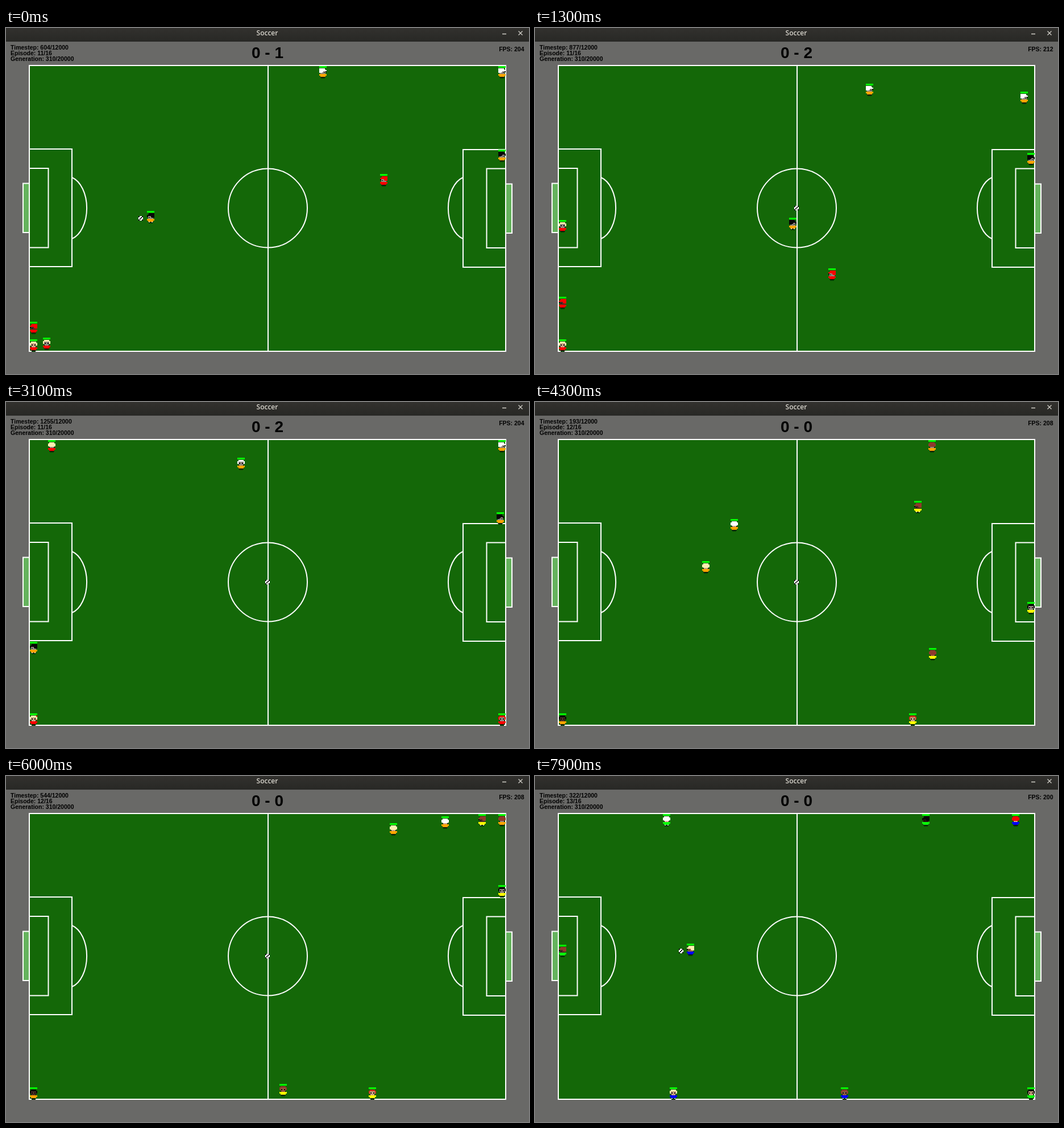
Animation, 920 px wide and 609 px high, one loop 8 s. Source, as an HTML page with a canvas:

```html
<!DOCTYPE html>
<html lang="en">
<head>
<meta charset="utf-8">
<title>Soccer</title>
<style>
  html, body { margin: 0; width: 100%; height: 100%; overflow: hidden; background: #696967; }
  svg, canvas { position: absolute; left: 0; top: 0; width: 920px; height: 609px; }
  text { font: bold 10.5px "Liberation Sans", Arial, sans-serif; fill: #000; white-space: pre; }
  .title { font: 600 12px "Open Sans", "Noto Sans", sans-serif; fill: #d8d5cd; }
  .score { font-size: 28px; }
  .lines { fill: none; stroke: #fff; stroke-width: 2; }
  .icon { fill: none; stroke: #d0cec7; stroke-width: 1.3; }
</style>
</head>
<body>
<svg viewBox="0 0 920 609">
  <defs>
    <linearGradient id="bar" x2="0" y2="1">
      <stop offset="0" stop-color="#32312e"/>
      <stop offset="1" stop-color="#282825"/>
    </linearGradient>
    <pattern id="net" width="2" height="2" patternUnits="userSpaceOnUse">
      <rect width="2" height="2" fill="#55a94c"/>
      <path d="M0 0h1v1h-1zM1 1h1v1h-1z" fill="#76bd6f"/>
    </pattern>
  </defs>
  <rect width="920" height="609" fill="#696967"/>
  <rect width="920" height="24" fill="url(#bar)"/>
  <text class="title" x="459.5" y="13" text-anchor="middle">Soccer</text>
  <path class="icon" d="M873 10.5h7M901.5 5.5l7 7m0-7l-7 7"/>

  <text id="step" x="8" y="38"></text>
  <text id="episode" x="8" y="48"></text>
  <text x="8" y="58">Generation: 310/20000</text>
  <text id="score" class="score" x="460" y="53" text-anchor="middle"></text>
  <text id="fps" x="911.5" y="41" text-anchor="end"></text>

  <rect x="41" y="66" width="838" height="503" fill="#146808"/>
  <path d="M30 273.5h11v86.5h-11zM879 274.5h11v86.5h-11z" fill="url(#net)"/>
  <g class="lines">
    <rect x="41" y="66" width="838" height="503"/>
    <path d="M461 66v503"/>
    <circle cx="460.5" cy="317" r="69.5"/>
    <path d="M41 213h75v207h-75M41 247h33.5v139.5h-33.5M41 273.5h-11v86.5h11"/>
    <path d="M116 263A35.5 56 0 0 1 116 371"/>
    <path d="M879 214h-75v207h75M879 247.5h-33.5v139.5h33.5M879 274.5h11v86.5h-11"/>
    <path d="M804 263A35.5 56 0 0 0 804 371"/>
  </g>
</svg>
<canvas id="play" width="920" height="609"></canvas>
<script>
const LOOP = 8000, TICK = 100;
const ctx = document.getElementById('play').getContext('2d');
const label = (id, text) => {
  const el = document.getElementById(id);
  if (el.textContent !== text) el.textContent = text;
};

// h hair, s skin, t shirt, f feet, k black, d shadow
const VIEWS = {
  f: ['.hhhhhh.', 'hhhhhhhh', 'hssssssh', 'hskssksh', '.ssssss.', '.kssssk.',
      'tttttttt', 'tttttttt', '.tttttt.', '.kfkkfk.', '..dddd..'],
  b: ['.hhhhhh.', 'hhhhhhhh', 'hhhhhhhh', 'hhhhhhhh', '.hhhhhh.', '.kssssk.',
      'tttttttt', 'tttttttt', '.tttttt.', '.kfkkfk.', '..dddd..'],
  l: ['..hhhhhh', '.hhhhhhh', 'hhhhhhhh', 'kssshhhh', '.sksshhh', '.ssssss.',
      'tttttttt', 'tttttttt', '.tttttt.', '.kfkkfk.', '..dddd..']
};
VIEWS.r = VIEWS.l.map(row => [...row].reverse().join(''));
const BALL = ['kwwk', 'wwkw', 'wkww', 'kwwk'];

const WHITE = '#ffffff', BLOND = '#ffeeb0', BLACK = '#060606', BROWN = '#8f3a2c', RED = '#ff0000';
const TAN = '#c9a182', GREY = '#938a80', DARK = '#4a2f25';
const ORANGE = '#ffa500', YELLOW = '#ffff00', GREEN = '#0aff0a', BLUE = '#0000ff';

// views: one letter per time; path: x, y of the energy bar per time
const player = (t, h, s, views, path, f = '#101010', times) => ({
  colours: { h, s, t, f, k: '#080808', d: '#0b3d05' }, views, path, times
});

const episodes = [
  {
    number: 11, start: 0, base: 604, rate: .21, times: [0, 1300, 3100],
    players: [
      player(RED, RED, DARK, 'lll', [48, 517, 48, 473, 48, 548]),
      player(RED, BLOND, TAN, 'fff', [48, 548, 48, 548, 48, 548]),
      player(RED, BLOND, GREY, 'ffb', [71, 545, 48, 338, 80, 67]),
      player(RED, RED, GREY, 'llf', [664, 257, 522, 423, 872, 548]),
      player(ORANGE, WHITE, GREY, 'rrf', [557, 67, 588, 98, 413, 98]),
      player(ORANGE, WHITE, GREY, 'rrr', [872, 67, 860, 112, 872, 67]),
      player(ORANGE, BLACK, GREY, 'rrr', [872, 214, 872, 220, 869, 194]),
      player(ORANGE, BLACK, GREY, 'lrrl', [254, 322, 132, 322, 453, 334, 48, 422], WHITE, [0, 360, 1300, 3100])
    ]
  },
  {
    number: 12, start: 3400, base: 7.2, rate: .20647, times: [3366, 4300, 6000],
    players: [
      player(ORANGE, BLACK, DARK, 'fff', [75, 295, 48, 548, 48, 548]),
      player(ORANGE, WHITE, TAN, 'rbb', [250, 165, 350, 206, 772, 71]),
      player(ORANGE, BLOND, TAN, 'rbb', [250, 430, 300, 280, 681, 83]),
      player(ORANGE, BROWN, GREY, 'rbb', [400, 295, 698, 67, 872, 67]),
      player(YELLOW, BLACK, GREY, 'fff', [845, 295, 872, 352, 872, 192]),
      player(YELLOW, BROWN, DARK, 'lll', [670, 165, 673, 174, 837, 67], WHITE),
      player(YELLOW, BROWN, '#9a5540', 'lbf', [670, 430, 699, 433, 487, 542]),
      player(YELLOW, '#c8301c', TAN, 'fff', [520, 295, 664, 548, 644, 548])
    ]
  },
  {
    number: 13, start: 6400, base: 15.4, rate: .20444, times: [6333, 7000, 7900],
    players: [
      player(GREEN, BROWN, DARK, 'lll', [75, 295, 48, 297, 48, 297]),
      player(GREEN, WHITE, '#e8b0a0', 'lfb', [250, 165, 155, 67, 231, 67], WHITE),
      player(GREEN, BLACK, '#20130e', 'rll', [250, 430, 326, 166, 687, 67]),
      player(GREEN, BLACK, TAN, 'rff', [400, 295, 674, 494, 872, 548]),
      player(BLUE, RED, TAN, 'bbb', [845, 295, 845, 67, 845, 67]),
      player(BLUE, BLOND, '#9a6245', 'lll', [670, 165, 581, 295, 273, 295]),
      player(BLUE, BROWN, '#8a5a40', 'fff', [670, 430, 544, 548, 544, 548], WHITE),
      player(BLUE, BLOND, TAN, 'fff', [520, 295, 398, 548, 243, 548], WHITE)
    ]
  }
];

const ballTimes = [0, 360, 560, 599, 600, 7300, 7400, 7900];
const ballPath = [237, 335, 116, 335, 42, 330, 36, 330, 460, 317, 460, 317, 428, 308, 257, 308];

// held readings: time, frames per second
const fps = [[0, 204], [400, 208], [900, 212], [1700, 208], [2200, 204], [2500, 208], [2900, 204],
  [3500, 208], [4800, 204], [5500, 208], [6700, 212], [7400, 204], [7700, 200]];

function pose(times, path, t) {
  const last = times.length - 1;
  let i = 0;
  while (i < last && t >= times[i + 1]) i++;
  const j = Math.min(i + 1, last);
  const p = j > i ? (t - times[i]) / (times[j] - times[i]) : 0;
  const mix = axis => path[2 * i + axis] + (path[2 * j + axis] - path[2 * i + axis]) * p;
  return { x: Math.round(mix(0)), y: Math.round(mix(1)), i };
}

function drawGrid(rows, colours, left, top, w, h) {
  const cw = w / rows[0].length, ch = h / rows.length;
  rows.forEach((row, r) => [...row].forEach((key, c) => {
    if (key === '.') return;
    const x = Math.round(c * cw), y = Math.round(r * ch);
    ctx.fillStyle = colours[key];
    ctx.fillRect(left + x, top + y, Math.round((c + 1) * cw) - x, Math.round((r + 1) * ch) - y);
  }));
}

function drawPlayer(p, times, t) {
  const { x, y, i } = pose(times, p.path, t);
  drawGrid(VIEWS[p.views[i]], p.colours, x - 6, y + 4, 13, 18);
  ctx.fillStyle = '#00ff00';
  ctx.fillRect(x - 6, y, 13, 3);
}

function render(t) {
  const ep = episodes.findLast(e => t >= e.start);
  ctx.clearRect(0, 0, 920, 609);
  const ball = pose(ballTimes, ballPath, t);
  drawGrid(BALL, { k: '#000', w: '#fff' }, ball.x - 4, ball.y - 4, 8, 8);
  for (const p of ep.players) drawPlayer(p, p.times || ep.times, t);

  const step = Math.round(ep.base + ep.rate * (t - ep.start));
  const goals = ep.number > 11 ? 0 : t < 600 ? 1 : 2;
  label('step', `Timestep: ${step}/12000`);
  label('episode', `Episode: ${ep.number}/16`);
  label('score', `0 - ${goals}`);
  label('fps', `FPS: ${fps.findLast(f => t >= f[0])[1]}`);
}

const begin = performance.now();
function frame() {
  const t = (performance.now() - begin) % LOOP;
  render(Math.floor(t / TICK) * TICK);
  requestAnimationFrame(frame);
}
frame();
</script>
</body>
</html>
```
